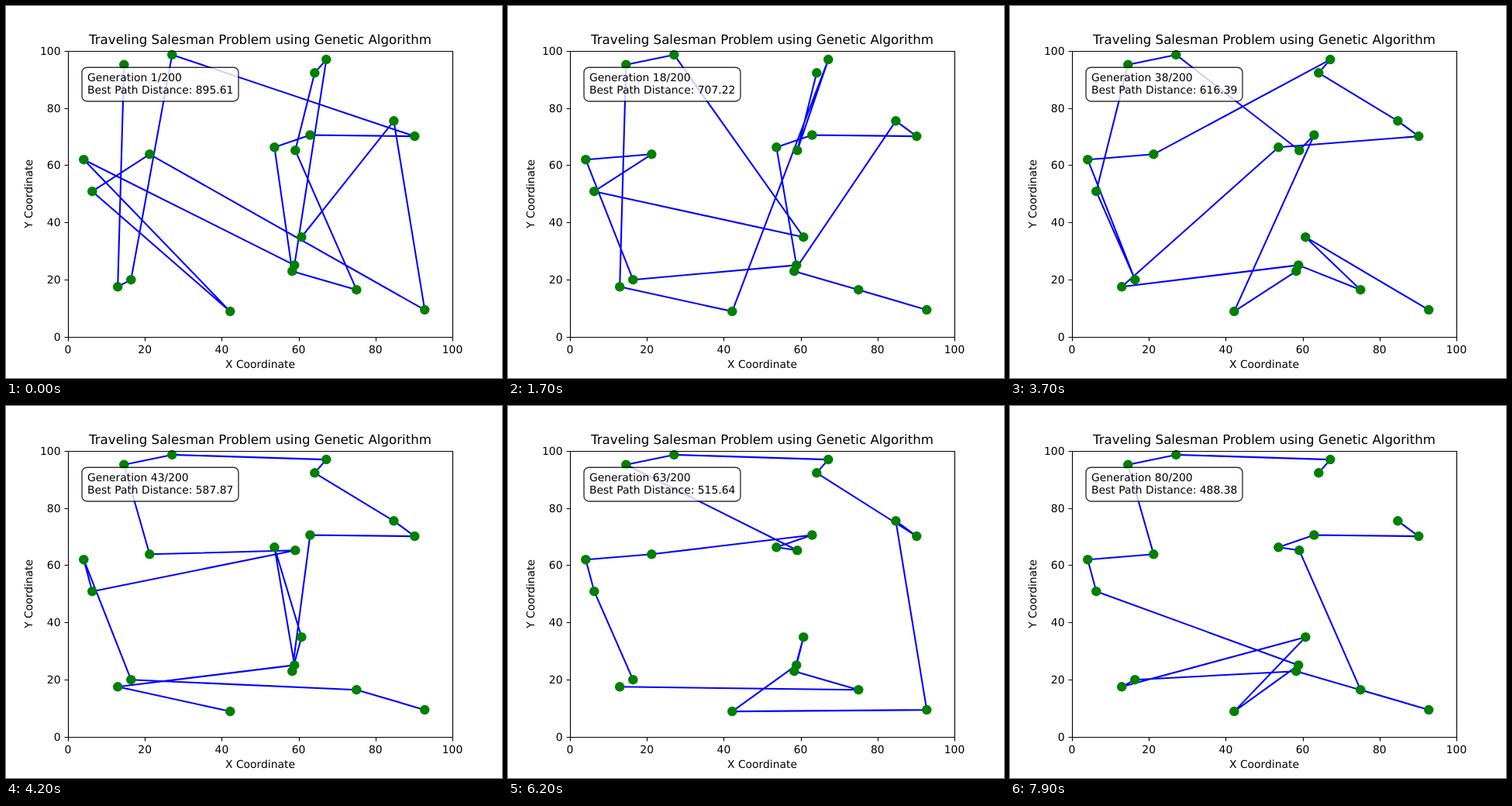
An HTML page for the animation above (8000 ms loop, 640 by 480 pixels).

```html
<!DOCTYPE html>
<html lang="en">
<head>
<meta charset="utf-8">
<title>Traveling Salesman Problem</title>
<style>
  html, body { margin: 0; width: 100%; height: 100%; overflow: hidden; background: #fff; }
  svg { display: block; }
  text { font: 13.89px "DejaVu Sans", sans-serif; text-rendering: geometricPrecision; white-space: pre; }
  .mid { text-anchor: middle; }
  .end { text-anchor: end; }
  #title { font-size: 16.67px; }
  #route { fill: none; stroke: #00f; stroke-width: 2.08; stroke-linejoin: round; stroke-linecap: square; }
  #cities { fill: #008000; }
  #axes { fill: none; stroke: #000; stroke-width: 1.11; }
</style>
</head>
<body>
<svg width="640" height="480" viewBox="0 0 640 480">
  <path id="route"/>
  <g id="cities"></g>
  <path id="axes"/>
  <g id="labels"></g>
  <text id="title" class="mid" x="328" y="49">Traveling Salesman Problem using Genetic Algorithm</text>
  <text class="mid" x="328" y="467">X Coordinate</text>
  <text class="mid" transform="translate(34 242.4) rotate(-90)">Y Coordinate</text>
  <rect x="98" y="79.2" width="202" height="43.8" rx="6.5" fill="#fff" stroke="#000" stroke-width="1.39" opacity=".8"/>
  <text id="generation" x="105" y="97"></text>
  <text id="distance" x="105" y="113"></text>
</svg>
<script>
const $ = id => document.getElementById(id);
const STEP = 100, LOOP = 8000;
const LEFT = 80, TOP = 57.6, WIDTH = 496, HEIGHT = 369.6;

// City positions in stage pixels
const cities = {
  A: [152.3, 75.8], B: [214.3, 62.9], C: [413.3, 69.1], D: [398.3, 86.3], E: [500.4, 148.3],
  F: [527.3, 168.1], G: [392.4, 166.5], H: [346.4, 182.3], I: [373.3, 186.3], J: [100.3, 198.2],
  K: [185.3, 191.3], L: [111.3, 239.2], M: [381.3, 298.2], N: [372.2, 334.4], O: [369.3, 342.2],
  P: [452.3, 366.2], Q: [289.3, 394.1], R: [540.3, 392.1], S: [144.2, 362.3], T: [161.3, 353.2]
};

// First generation, visiting order, and path length (measured when omitted)
const routes = [
  [1, 'ASTBFGHOPIDCNJQLKREM', 895.61],
  [4, 'ASTBFGHOPIDCNJQLKMRE'],
  [7, 'DPROEFGHNTJKLMBASQCI', 775.88],
  [13, 'RPOEFGHNTJKLMBASQCID'],
  [20, 'RPOEFGHNTJKLMBASQIDC'],
  [26, 'RMPNSHFEDCKJTLABIGQO', 616.39],
  [40, 'QSNHMOGFEDCBAKILJTPR', 587.87],
  [51, 'GFEDCBAKSTLJPNOQIRMH', 569.95],
  [60, 'SPOMNQREFDCBAIHGKJLT'],
  [67, 'RHFEGDCABKJLITSQOMNP', 505.85],
  [73, 'DCBAKJLNQMSTORPIHGFE', 488.38]
];

function measure(order) {
  let sum = 0;
  for (let i = 1; i < order.length; i++) {
    const [x0, y0] = cities[order[i - 1]], [x1, y1] = cities[order[i]];
    sum += Math.hypot((x1 - x0) * 100 / WIDTH, (y1 - y0) * 100 / HEIGHT);
  }
  return sum;
}

function drawAxes() {
  const snap = v => Math.round(v) + 0.5;
  let path = `M${snap(LEFT)} ${snap(TOP)}H${snap(LEFT + WIDTH)}V${snap(TOP + HEIGHT)}H${snap(LEFT)}Z`;
  let labels = '';
  for (let v = 0; v <= 100; v += 20) {
    const x = LEFT + WIDTH * v / 100, y = TOP + HEIGHT * (1 - v / 100);
    path += `M${snap(x)} 427.5v5M80.5 ${snap(y)}h-5`;
    labels += `<text class="mid" x="${x}" y="448">${v}</text>`
            + `<text class="end" x="70.5" y="${Math.round(y) + 5}">${v}</text>`;
  }
  $('axes').setAttribute('d', path);
  $('labels').innerHTML = labels;
}

function drawCities() {
  $('cities').innerHTML = Object.values(cities)
    .map(([x, y]) => `<circle cx="${x}" cy="${y}" r="6.25"/>`).join('');
}

let shown = 0;
function frame() {
  const generation = Math.floor(performance.now() % LOOP / STEP) + 1;
  if (generation !== shown) {
    shown = generation;
    const [, order, length = measure(order)] = routes.findLast(r => r[0] <= generation);
    $('route').setAttribute('d', 'M' + [...order].map(c => cities[c].join(' ')).join('L'));
    $('generation').textContent = `Generation ${generation}/200`;
    $('distance').textContent = `Best Path Distance: ${length.toFixed(2)}`;
  }
  requestAnimationFrame(frame);
}

drawAxes();
drawCities();
frame();
</script>
</body>
</html>
```
